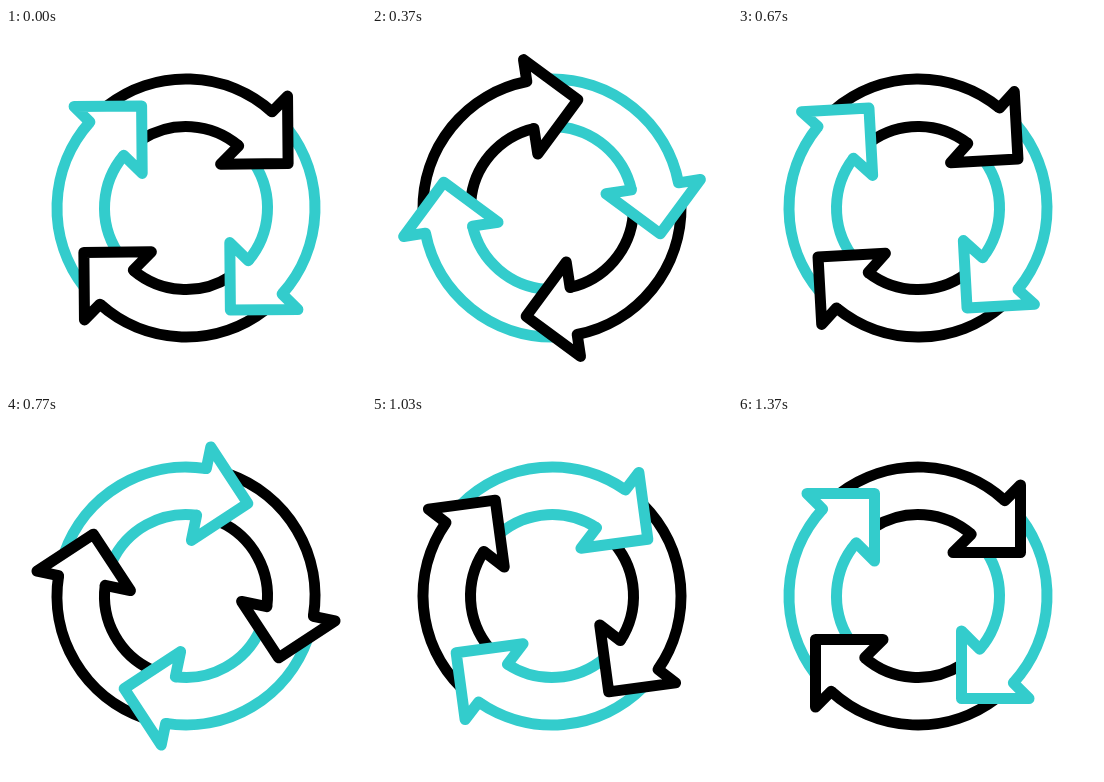
These frames come from a looping animation (360 px wide and 360 px high, 1670 ms). An HTML page with a canvas:

```html
<!DOCTYPE html>
<html lang="en">
<head>
<meta charset="utf-8">
<title>Turning arrows</title>
<style>
  html, body { margin: 0; width: 100%; height: 100%; overflow: hidden; background: #fff; }
  canvas { display: block; width: 360px; height: 360px; }
</style>
</head>
<body>
<canvas id="stage" width="360" height="360"></canvas>
<script>
const ctx = document.getElementById('stage').getContext('2d');
const LOOP = 1670;
const LAST_STEP = 41;
const COLORS = ['#000', '#33cccc'];
const OUTER = 129, INNER = 81.5;
const HEAD = { right: 102.5, top: -111, bottom: -43.5, left: 35 };

// Where the slanted back of the head (x + y = sum) crosses a circle.
function notch(radius) {
  const sum = HEAD.right + HEAD.top;
  const diff = Math.sqrt(2 * radius * radius - sum * sum);
  return [(sum + diff) / 2, (sum - diff) / 2];
}

const outerNotch = notch(OUTER);
const innerNotch = notch(INNER);
const angleOf = ([x, y]) => Math.atan2(y, x);

// Each tail starts on the edge of the head one quarter turn behind it.
const outerTail = -Math.acos(HEAD.right / OUTER) - Math.PI / 2;
const innerTail = Math.asin(HEAD.bottom / INNER) - Math.PI / 2;

function ease(u) {
  const x1 = 0.445, x2 = 0.52;
  let lo = 0, hi = 1;
  for (let i = 0; i < 30; i++) {
    const t = (lo + hi) / 2, s = 1 - t;
    const x = 3 * x1 * t * s * s + 3 * x2 * t * t * s + t * t * t;
    if (x < u) lo = t; else hi = t;
  }
  return lo * lo * (3 - 2 * lo);
}

// Wind back, then swing forward to a full turn.
function rotation(step) {
  const back = -55.4, turn = 14, end = 42;
  return step < turn
    ? back * ease(step / turn)
    : back + (360 - back) * ease((step - turn) / (end - turn));
}

function drawTail() {
  ctx.lineCap = 'butt';
  ctx.beginPath();
  ctx.arc(0, 0, OUTER, outerTail, angleOf(outerNotch));
  ctx.stroke();
  ctx.beginPath();
  ctx.arc(0, 0, INNER, innerTail, angleOf(innerNotch));
  ctx.stroke();
}

function drawHead() {
  ctx.lineCap = 'round';
  ctx.beginPath();
  ctx.moveTo(...outerNotch);
  ctx.lineTo(HEAD.right, HEAD.top);
  ctx.lineTo(HEAD.right, HEAD.bottom);
  ctx.lineTo(HEAD.left, HEAD.bottom);
  ctx.lineTo(...innerNotch);
  ctx.stroke();
}

function forEachArrow(draw) {
  for (let i = 0; i < 4; i++) {
    ctx.strokeStyle = COLORS[i % 2];
    draw();
    ctx.rotate(Math.PI / 2);
  }
}

function render(time) {
  const tick = Math.floor(time / 10) * 10;
  const step = Math.min(LAST_STEP, Math.floor((tick + 5) * 0.03));
  ctx.setTransform(1, 0, 0, 1, 0, 0);
  ctx.fillStyle = '#fff';
  ctx.fillRect(0, 0, 360, 360);
  ctx.translate(180, 180);
  ctx.rotate(rotation(step + 1) * Math.PI / 180);
  ctx.lineWidth = 11;
  ctx.lineJoin = 'round';
  forEachArrow(drawTail);
  forEachArrow(drawHead);
}

const start = performance.now();
function loop() {
  render((performance.now() - start) % LOOP);
  requestAnimationFrame(loop);
}
loop();
</script>
</body>
</html>
```
